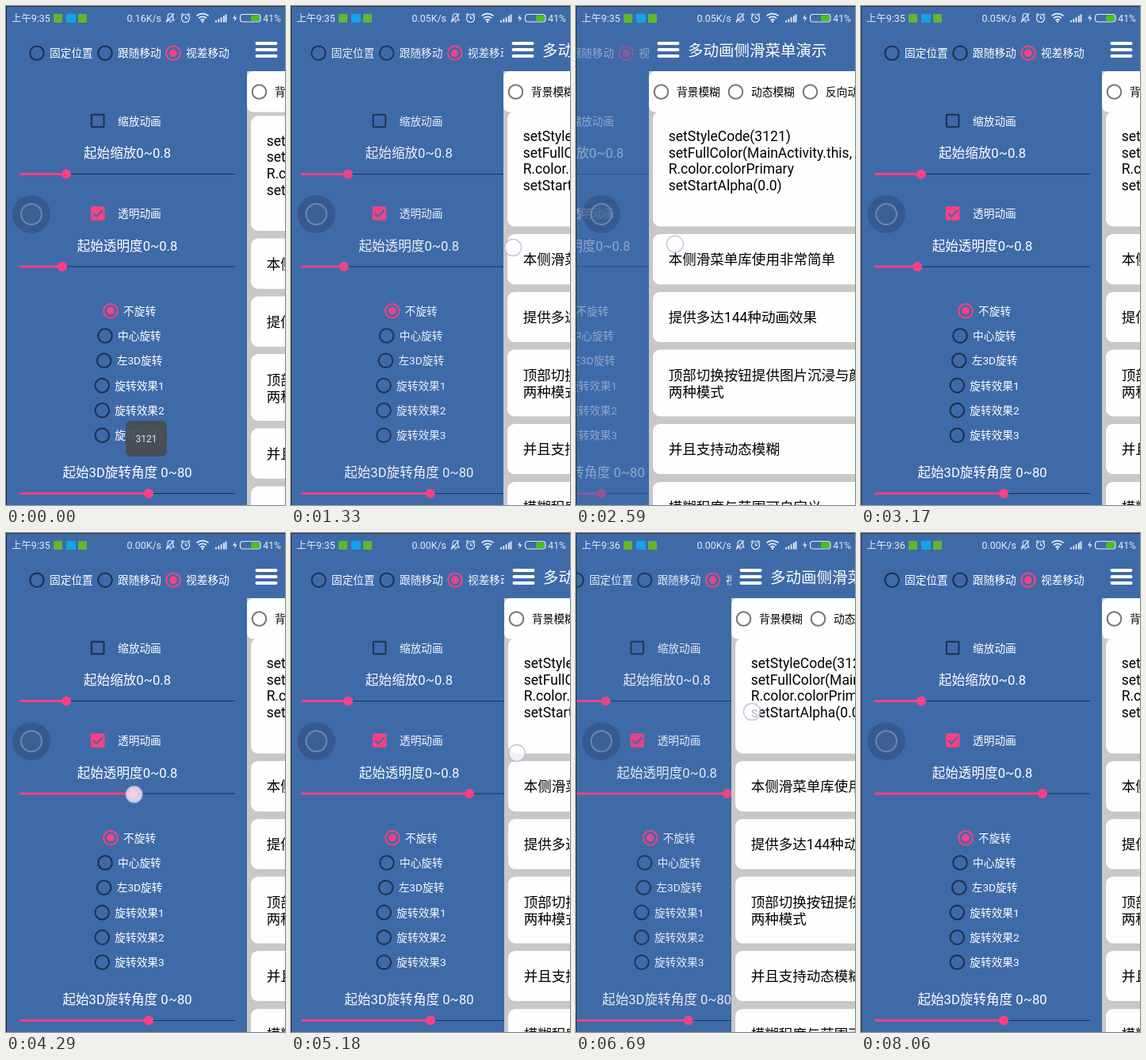
An HTML page for the animation above (8.28 s loop, 352x628 px).

```html
<!DOCTYPE html>
<html lang="zh-CN">
<head>
<meta charset="utf-8">
<title>侧滑菜单</title>
<style>
html, body { margin: 0; width: 100%; height: 100%; overflow: hidden; background: #3f6aa8; }
svg { display: block; width: 352px; height: 628px; }
text { font-family: Roboto, "Noto Sans CJK SC", "Noto Sans CJK", sans-serif; white-space: pre; }
</style>
</head>
<body>
<svg id="stage" viewBox="0 0 352 628" xmlns="http://www.w3.org/2000/svg">
  <rect width="352" height="628" fill="#3f6aa8"/>
  <g id="menu"></g>
  <g id="main">
    <rect width="360" height="628" fill="#3f6aa8"/>
    <rect y="82" width="360" height="546" fill="#c8c8c8"/>
    <g id="list"></g>
    <g id="bar"></g>
  </g>
  <g id="ball">
    <circle cx="32" cy="262" r="24" fill="#2c4772" fill-opacity=".45"/>
    <circle cx="32" cy="262" r="13" fill="#4a6c9f" fill-opacity=".35" stroke="#7792bb" stroke-opacity=".8" stroke-width="2"/>
  </g>
  <g id="status" fill="none" stroke="#e3eaf4" stroke-width="1.2">
    <g stroke="none">
      <rect x="60" y="10" width="11" height="11" rx="1" fill="#63b52d"/>
      <rect x="76" y="10" width="12" height="11" rx="1" fill="#0fa5e6"/>
      <rect x="91" y="10" width="11" height="11" rx="1" fill="#63b52d"/>
    </g>
    <path d="M203 18h9l-1.3-2v-3.2a3.3 3.3 0 0 0-6.6 0v3.2zM206 20h3M202 20.5l10-11"/>
    <circle cx="226.500" cy="15.500" r="5"/>
    <path d="M226.500 12.500v3.200h2.500M221 11.500l2.500-2.200M232 11.500l-2.500-2.200"/>
    <path d="M240.500 12.500a11 11 0 0 1 15 0M243 15.300a7.500 7.500 0 0 1 10 0M245.500 18a4 4 0 0 1 5 0" stroke-width="1.700"/>
    <circle cx="248" cy="19.800" r="1.200" fill="#e3eaf4" stroke="none"/>
    <path d="M265 20.500v-2.500M268.300 20.500v-4.300M271.600 20.500v-6.200M274.900 20.500v-8.300M277.500 20.500v-10" stroke-width="1.900"/>
    <path d="M289.500 10.500l-3.500 5.300h2.800l-1 4.200 3.700-5.500h-2.800z" fill="#e3eaf4" stroke="none"/>
    <rect x="295.500" y="10.500" width="25.500" height="9.500" rx="3.500"/>
    <rect x="309" y="11.500" width="11" height="7.500" rx="2" fill="#4cc01e" stroke="none"/>
  </g>
  <g id="toast">
    <rect x="151" y="522" width="52" height="45" rx="7" fill="#484d53" fill-opacity=".95"/>
  </g>
  <circle id="touch" r="10.500" fill="#fff" fill-opacity=".72" stroke="#a5acd0" stroke-opacity=".7" stroke-width="1.300"/>
  <path d="M0 .5H352M.5 0V628" stroke="#2d3440" fill="none"/>
</svg>
<script>
const LOOP = 8280, OPEN = 304;
const PINK = '#ff4081', DARK = '#1d2f4e', BLUE = '#3f6aa8';
const $ = id => document.getElementById(id);

function add(parent, tag, attrs, words) {
  const el = document.createElementNS('http://www.w3.org/2000/svg', tag);
  for (const k in attrs) el.setAttribute(k, attrs[k]);
  if (words) el.textContent = words;
  parent.appendChild(el);
  return el;
}
const label = (g, x, y, size, words, fill = '#fff', anchor = 'start') =>
  add(g, 'text', { x, y, 'font-size': size, fill, 'text-anchor': anchor }, words);

function radio(g, x, y, textX, words, on, ring = DARK, ink = '#fff') {
  add(g, 'circle', { cx: x, cy: y, r: 8.8, fill: 'none', stroke: on ? PINK : ring, 'stroke-width': 2 });
  if (on) add(g, 'circle', { cx: x, cy: y, r: 4.8, fill: PINK });
  label(g, textX, y + 5, 13.7, words, ink);
}

function check(y, words, on) {
  add(menu, 'rect', { x: 107.9, y: y - 7.8, width: 15.6, height: 15.6, rx: 1,
    fill: on ? PINK : 'none', stroke: on ? PINK : DARK, 'stroke-width': 2 });
  if (on) add(menu, 'path', { d: `M110 ${y}l4 4 8-8`, fill: 'none', stroke: BLUE, 'stroke-width': 2 });
  label(menu, 141, y + 5, 13.7, words);
}

function slider(y, title, value) {
  label(menu, 153, y - 20.5, 16.6, title, '#fff', 'middle');
  add(menu, 'path', { d: `M17 ${y}H289`, stroke: DARK, 'stroke-width': 1.1 });
  const line = add(menu, 'path', { stroke: PINK, 'stroke-width': 3.2 });
  const knob = add(menu, 'circle', { cy: y, r: 6, fill: PINK });
  const set = x => {
    line.setAttribute('d', `M17 ${y}H${x}`);
    knob.setAttribute('cx', x);
  };
  set(value);
  return set;
}

const menu = $('menu'), main = $('main'), list = $('list'), bar = $('bar'), touch = $('touch');

['固定位置', '跟随移动', '视差移动'].forEach((s, i) => radio(menu, 39 + 86 * i, 59.3, 55 + 86 * i, s, i === 2));
check(144.5, '缩放动画', false);
slider(211.5, '起始缩放0~0.8', 76);
check(261, '透明动画', true);
const setAlpha = slider(328, '起始透明度0~0.8', 71);
[['不旋转', 132], ['中心旋转', 125], ['左3D旋转', 123.7], ['旋转效果1', 121.3], ['旋转效果2', 121.3], ['旋转效果3', 121.3]]
  .forEach(([s, x], i) => radio(menu, x, 383.7 + 31.3 * i, x + 16, s, i === 0));
slider(613.5, '起始3D旋转角度 0~80', 180);

// Cards: top, height, first baseline, lines
[
  [138.3, 144.7, 175.7, 'setStyleCode(3121)', 'setFullColor(MainActivity.this,', 'R.color.colorPrimary', 'setStartAlpha(0.0)'],
  [292.5, 63.5, 331, '本侧滑菜单库使用非常简单'],
  [365.5, 63.2, 404, '提供多达144种动画效果'],
  [438, 84, 477, '顶部切换按钮提供图片沉浸与颜色沉浸', '两种模式'],
  [531.5, 63.2, 570, '并且支持动态模糊'],
  [604.5, 63.2, 643, '模糊程度与范围可自定义']
].forEach(([y, height, base, ...lines]) => {
  add(list, 'rect', { x: 5, y, width: 342, height, rx: 9, fill: '#fdfefe' });
  lines.forEach((s, i) => label(list, 24.7, base + 20.6 * i, 17.55, s, '#000'));
});

add(bar, 'rect', { y: 82, width: 352, height: 51.5, rx: 8, fill: '#fdfefe' });
['背景模糊', '动态模糊', '反向动画'].forEach((s, i) =>
  radio(bar, 15.5 + 94 * i, 108, 35 + 94 * i, s, false, '#757575', '#000'));
add(bar, 'path', { d: 'M12.500 47H36.500M12.500 55H36.500M12.500 63H36.500', stroke: '#fff', 'stroke-width': 4, 'stroke-linecap': 'round' });
label(bar, 49, 62.500, 19.5, '多动画侧滑菜单演示');

const status = add($('stage'), 'g', {});
const clock = label(status, 7, 20, 12.4, '', '#e3eaf4');
const speed = label(status, 196, 20, 12.4, '', '#e3eaf4', 'end');
label(status, 347, 20, 12.2, '41%', '#e3eaf4', 'end');
label($('toast'), 177, 549, 12, '3121', '#e4e4e4', 'middle');

// Screen refresh times: the picture holds between them
const beats = [0, 410, 540, 670, 800, 930, 1060, 1200, 1330,
  1490, 1620, 1760, 1890, 2030, 2180, 2320, 2460,
  2590, 2730, 2870, 3020, 3170,
  3780, 3910, 4030, 4160, 4280, 4410, 4530, 4660, 4790, 4910,
  5180, 5300, 5450, 5600, 5750, 5910, 6040, 6180,
  6300, 6430, 6560, 6690, 6850, 6980, 7110, 7240, 7540, 7700, 7880, 8060];

const panelKeys = [[1200, OPEN], [1330, 268], [2030, 142], [2320, 66], [2460, 62], [2590, 92], [3020, 285], [3170, OPEN],
  [4910, OPEN], [5180, 269], [5750, 94], [6040, 40], [6180, 46], [6690, 196], [7240, 268], [7540, 290], [7700, OPEN]];
const touchKeys = [[1200, 294, 305], [1330, 280, 304], [2030, 147, 302], [2460, 72, 300], [3020, 300, 298],
  [3780, 73, 329], [4660, 229, 329], [4790, 229, 326],
  [5180, 285, 277], [5750, 107, 266], [6040, 55, 256], [6180, 66, 250], [6690, 222, 225], [7240, 296, 221]];
const alphaKeys = [[3780, 71], [4660, 229]];
const scrollKeys = [[540, 0], [1060, 5.6]];
const toastKeys = [[0, 1], [410, .75], [670, 0]];

function at(keys, t, col = 1) {
  if (t <= keys[0][0]) return keys[0][col];
  for (let i = 1; i < keys.length; i++) {
    const a = keys[i - 1], b = keys[i];
    if (t <= b[0]) return a[col] + (b[col] - a[col]) * (t - a[0]) / (b[0] - a[0]);
  }
  return keys[keys.length - 1][col];
}
const within = (t, a, b) => t >= a && t < b;

function draw(now) {
  const time = now % LOOP;
  const t = beats.filter(b => b <= time).pop();
  const x = at(panelKeys, t), open = x / OPEN, knob = at(alphaKeys, t);
  const low = (knob - 17) / 272 * .8;

  main.setAttribute('transform', `translate(${x} 0)`);
  menu.setAttribute('transform', `translate(${-OPEN * (1 - open) ** 2} 0)`);
  menu.setAttribute('opacity', low + (1 - low) * open);
  list.setAttribute('transform', `translate(0 ${-at(scrollKeys, t)})`);
  setAlpha(knob);
  $('toast').setAttribute('opacity', t < 410 ? 1 : at(toastKeys, t));

  const down = within(t, 1200, 3170) || within(t, 3780, 4910) || within(t, 5180, 7540);
  touch.setAttribute('opacity', down ? 1 : 0);
  touch.setAttribute('cx', at(touchKeys, t, 1));
  touch.setAttribute('cy', at(touchKeys, t, 2));

  clock.textContent = t < 6300 ? '上午9:35' : '上午9:36';
  speed.textContent = (t < 1060 ? '0.16' : t < 4160 ? '0.05' : '0.00') + 'K/s';
}

function tick() {
  draw(performance.now());
  requestAnimationFrame(tick);
}
tick();
</script>
</body>
</html>
```
